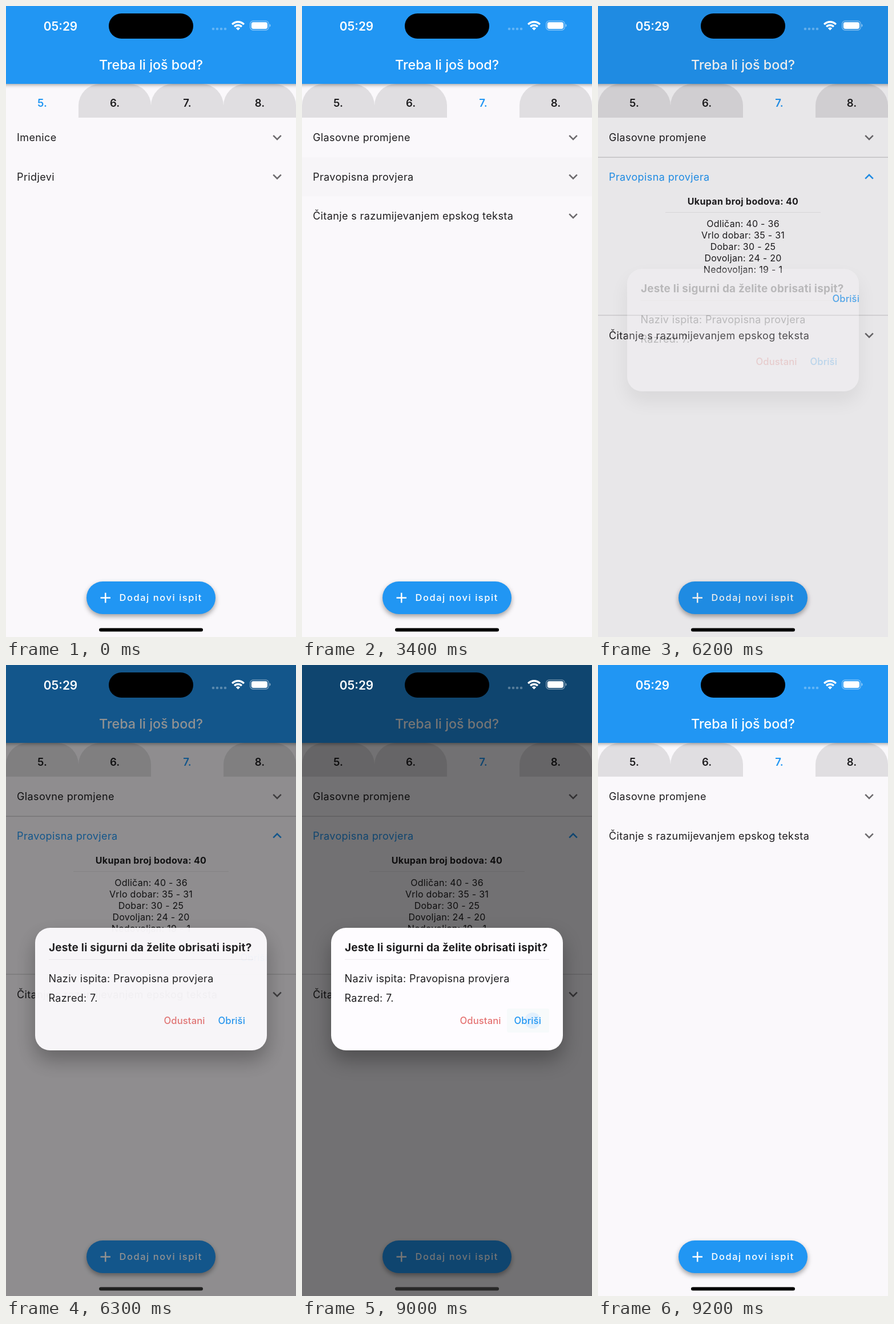
Write an HTML page with a canvas that moves like this. It is 508 by 1102 pixels and loops after 9.3 s.

```html
<!DOCTYPE html>
<html lang="hr">
<head>
<meta charset="utf-8">
<style>
  html, body { margin: 0; width: 100%; height: 100%; overflow: hidden; background: #faf8fb; }
  canvas { display: block; width: 508px; height: 1102px; }
</style>
</head>
<body>
<canvas id="stage"></canvas>
<script>
const W = 508, H = 1102, LOOP = 9300, STEP = 100;
const FONT = 'Inter, Roboto, sans-serif';
const BLUE = [33, 150, 243], INK = [30, 29, 31], GREY = [108, 106, 109];
const ROW = 68.5, LIST_TOP = 195.3, DETAILS = 208.5;
const dpr = window.devicePixelRatio || 1;

function layer(canvas) {
  canvas.width = W * dpr;
  canvas.height = H * dpr;
  const c = canvas.getContext('2d');
  c.scale(dpr, dpr);
  return c;
}

const screen = layer(document.getElementById('stage'));
const sheet = layer(document.createElement('canvas'));
let g = screen;

const clamp = v => Math.max(0, Math.min(1, v));
const ramp = (t, start, length) => clamp((t - start) / length);
const easeIn = p => Math.pow(p, 1.7);
const easeOut = p => 1 - Math.pow(1 - p, 1.8);
const rgb = c => `rgb(${c.join(',')})`;
const mix = (a, b, k) => rgb(a.map((v, i) => Math.round(v + (b[i] - v) * k)));

// y is the middle of the capital letters
function text(str, x, y, size, { color = rgb(INK), weight = 400, gap = 0, align = 'left' } = {}) {
  g.font = `${weight} ${size}px ${FONT}`;
  g.letterSpacing = gap + 'px';
  g.textAlign = align;
  g.fillStyle = color;
  g.fillText(str, x, y + size * 0.364);
}

function box(x, y, w, h, r, color) {
  g.fillStyle = color;
  g.beginPath();
  g.roundRect(x, y, w, h, r);
  g.fill();
}

function disc(x, y, r, color) {
  g.fillStyle = color;
  g.beginPath();
  g.arc(x, y, r, 0, Math.PI * 2);
  g.fill();
}

function shadow(alpha, blur, dy) {
  g.shadowColor = `rgba(0,0,0,${alpha})`;
  g.shadowBlur = blur * dpr;
  g.shadowOffsetY = dy * dpr;
}

function chevron(y, turn, color) {
  g.save();
  g.translate(475, y);
  g.rotate(turn * Math.PI);
  g.strokeStyle = color;
  g.lineWidth = 2.6;
  g.beginPath();
  g.moveTo(-6.8, -3.5);
  g.lineTo(0, 3.3);
  g.lineTo(6.8, -3.5);
  g.stroke();
  g.restore();
}

function tile(label, y, open = 0) {
  text(label, 19, y, 18, { gap: 0.39, color: mix(INK, BLUE, open) });
  chevron(y, open, mix(GREY, BLUE, open));
}

function appBar() {
  g.save();
  shadow(0.34, 6, 2);
  box(-10, -10, W + 20, 146, 0, rgb(BLUE));
  g.restore();
  text('Treba li još bod?', 254, 103, 23.3, { weight: 500, color: '#fff', align: 'center' });
}

function tabs(from, to, k) {
  for (let i = 0; i < 4; i++) {
    const x = i * 127;
    if (i !== to) box(x, 136, 127, 59, [38, 38, 0, 0], '#e0dee1');
    const active = i === to ? k : i === from ? 1 - k : 0;
    text(`${i + 5}.`, x + 63.5, 169.5, 18.6, { weight: 600, color: mix(INK, BLUE, active), align: 'center' });
  }
}

function details(height) {
  g.save();
  g.beginPath();
  g.rect(0, 332.5, W, height);
  g.clip();
  g.translate(0, (height - DETAILS) / 2);
  text('Ukupan broj bodova: 40', 254, 341, 16, { weight: 700, gap: 0.32, align: 'center' });
  box(118, 360, 272, 1, 0, '#e7e5e8');
  ['Odličan: 40 - 36', 'Vrlo dobar: 35 - 31', 'Dobar: 30 - 25', 'Dovoljan: 24 - 20', 'Nedovoljan: 19 - 1']
    .forEach((line, i) => text(line, 254, 380 + i * 20.1, 16, { gap: 0.28, align: 'center' }));
  text('Obriši', 410.5, 510.5, 16.6, { weight: 500, gap: 0.1, color: rgb(BLUE) });
  g.restore();
}

function list(t) {
  const y = i => LIST_TOP + ROW * (i + 0.5);
  if (t < 1700) {
    tile('Imenice', y(0));
    tile('Pridjevi', y(1));
    return;
  }
  tile('Glasovne promjene', y(0));
  if (t >= 9100) {
    tile('Čitanje s razumijevanjem epskog teksta', y(1));
    return;
  }
  const p = ramp(t, 3440, 200), open = easeIn(p), height = DETAILS * open;
  const press = ramp(t, 3350, 150) * (1 - ramp(t, 3600, 300));
  if (press) box(0, 264, W, ROW, 0, `rgba(0,0,0,${0.04 * press})`);
  tile('Pravopisna provjera', y(1), open);
  if (p) {
    details(height);
    const line = `rgba(0,0,0,${0.17 * easeOut(p)})`;
    box(0, 263.6, W, 1.3, 0, line);
    box(0, 331 + height, W, 1.3, 0, line);
  }
  tile('Čitanje s razumijevanjem epskog teksta', y(2) + height);
}

function fab() {
  g.save();
  shadow(0.36, 9, 4);
  box(141, 1005, 226, 57, 28.5, rgb(BLUE));
  g.restore();
  box(165.5, 1032.3, 17.5, 2.5, 0, '#fff');
  box(173, 1024.8, 2.5, 17.5, 0, '#fff');
  text('Dodaj novi ispit', 198.5, 1033.5, 16.4, { weight: 500, gap: 1.6, color: '#fff' });
}

function dialog(t) {
  g.clearRect(0, 0, W, H);
  g.save();
  shadow(0.3, 34, 17);
  box(51, 459, 406, 214, 26, '#fefcff');
  g.restore();
  text('Jeste li sigurni da želite obrisati ispit?', 75, 493.5, 18.9, { weight: 700, gap: 0.25 });
  box(75, 513.8, 358, 1, 0, '#eceaed');
  text('Naziv ispita: Pravopisna provjera', 74.5, 547, 18, { gap: 0.34 });
  text('Razred: 7.', 74.5, 581, 18, { gap: 0.34 });
  if (t >= 9000) {
    box(359, 600, 74, 42, 3, '#f7fafb');
    g.save();
    g.beginPath();
    g.rect(359, 600, 74, 42);
    g.clip();
    disc(404, 621, 14 + (t - 9000) * 0.2, '#e2f0fd');
    g.restore();
  }
  text('Odustani', 276.5, 620.5, 16.6, { weight: 500, gap: 0.1, color: '#e57373' });
  text('Obriši', 371.5, 620.5, 16.6, { weight: 500, gap: 0.1, color: rgb(BLUE) });
}

function wifi(x, y) {
  g.save();
  g.beginPath();
  g.moveTo(x, y);
  g.lineTo(x - 20, y - 20);
  g.lineTo(x + 20, y - 20);
  g.clip();
  disc(x, y, 5.2, '#fff');
  g.strokeStyle = '#fff';
  g.lineWidth = 3.4;
  for (const r of [9, 14.7]) {
    g.beginPath();
    g.arc(x, y, r, 0, Math.PI * 2);
    g.stroke();
  }
  g.restore();
}

function statusBar(dim) {
  text('05:29', 95.5, 35, 20.8, { weight: 600, color: '#fff', align: 'center' });
  box(180, 13, 148, 44, 22, '#000');
  for (let i = 0; i < 4; i++) disc(363 + i * 7, 40, 2.3, 'rgba(255,255,255,.3)');
  wifi(406.5, 42.5);
  g.strokeStyle = 'rgba(255,255,255,.45)';
  g.lineWidth = 1.3;
  g.beginPath();
  g.roundRect(427.7, 26.2, 32.4, 15.8, 5);
  g.stroke();
  box(429.8, 28.3, 28.2, 11.6, 3.4, '#fff');
  box(461.6, 31.6, 1.8, 5, [0, 2, 2, 0], 'rgba(255,255,255,.5)');
  box(163, 1086.5, 182, 6, 3, mix([0, 0, 0], [40, 40, 40], dim));
}

function draw(t) {
  g = screen;
  g.fillStyle = '#faf8fb';
  g.fillRect(0, 0, W, H);

  const moved = t >= 1700;
  tabs(0, moved ? 2 : 0, moved ? ramp(t, 1640, 260) : 1);
  list(t);
  appBar();
  fab();

  const shown = t < 9000 ? ramp(t, 6180, 150) : 1 - ramp(t, 9017, 150);
  if (shown) {
    g.fillStyle = `rgba(0,0,0,${0.54 * shown})`;
    g.fillRect(0, 0, W, H);
    g = sheet;
    dialog(t);
    g = screen;
    g.globalAlpha = easeOut(shown);
    g.drawImage(sheet.canvas, 0, 0, W, H);
    g.globalAlpha = 1;
  }
  statusBar(shown);
}

// Time advances in steps, ten pictures a second
const start = performance.now();
function tick() {
  const t = (performance.now() - start) % LOOP;
  draw(Math.floor(t / STEP) * STEP);
  requestAnimationFrame(tick);
}
tick();
</script>
</body>
</html>
```
